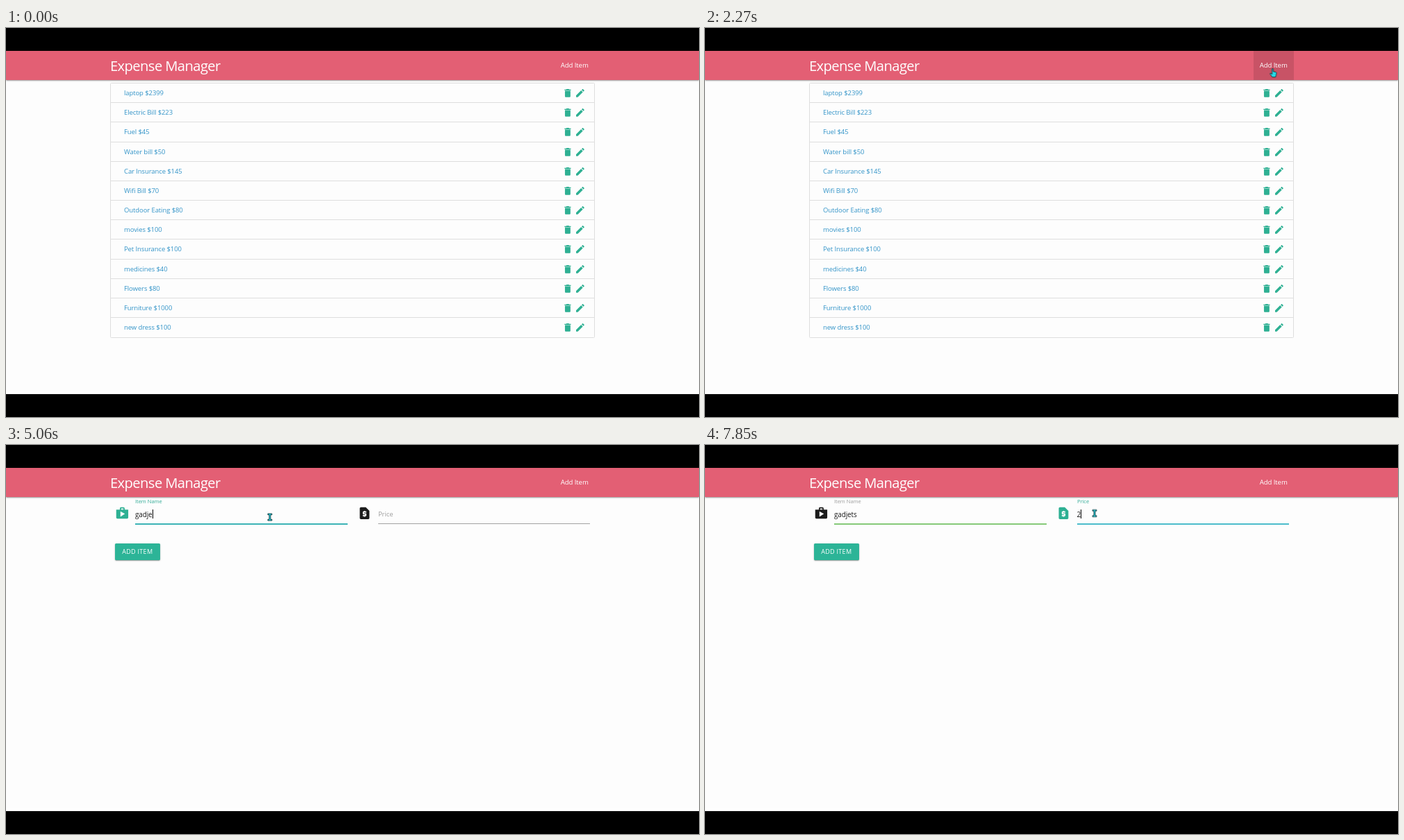
These frames come from a looping animation (998x561 px, 8 s). An HTML page:

```html
<!DOCTYPE html>
<html lang="en">
<head>
<meta charset="utf-8">
<title>Expense Manager</title>
<style>
* { box-sizing: border-box; }
html, body { margin: 0; width: 100%; height: 100%; overflow: hidden; background: #000; }
#stage {
  position: relative; width: 998px; height: 561px; overflow: hidden; background: #000;
  font: 9.5px/14px "Open Sans", "Noto Sans", sans-serif; letter-spacing: -.01em; white-space: pre;
}
#stage * { animation-duration: 8s; animation-iteration-count: infinite; animation-timing-function: linear; }
.abs, #stage > *, .field > * { position: absolute; }

#page { left: 0; top: 33px; width: 998px; height: 495px; background: #fdfdfd; border-bottom: 4px solid #fff; }
nav {
  left: 0; top: 33px; width: 998px; height: 42px; color: #fff; background: #e35f74;
  box-shadow: 0 1px 1.5px rgba(0,0,0,.16), 0 2px 1px -1px rgba(0,0,0,.12), 0 .5px 3px rgba(0,0,0,.2);
}
nav b { left: 150px; top: 0; font-size: 20.2px; font-weight: 400; line-height: 43.5px; letter-spacing: -.03em; }
nav a { left: 789.5px; top: 0; width: 58.5px; height: 42px; line-height: 41.5px; font-size: 9.6px; text-align: center; }
nav i { left: 789.5px; top: 0; width: 58.5px; height: 42px; background: rgba(0,0,0,.12); animation-name: hover; }

#list {
  left: 150px; top: 79px; width: 698px; margin: 0; padding: 0; list-style: none;
  border: 1px solid #dedede; border-radius: 1.5px; color: #3394c8; animation-name: list;
}
#list li { position: relative; height: 28.18px; padding-left: 19px; line-height: 27.4px; border-bottom: 1px solid #dedede; }
#list li:last-child { border-bottom: 0; }
#list svg { position: absolute; top: 6px; left: 649.7px; width: 15.8px; height: 15.8px; fill: #2eb093; }
#list svg + svg { left: 667.9px; }

#form { left: 0; top: 0; width: 998px; height: 561px; animation-name: form; }
#stage #list, #stage #form { animation-timing-function: step-end; }
.field { top: 0; }
.field svg { left: -29.5px; top: 88px; width: 20.8px; height: 20.8px; fill: #1c1c1c; }
.field label { left: 0; top: 92.5px; color: #9e9e9e; transform-origin: 0 50%; }
.field hr { left: 0; top: 113px; width: 305.5px; height: 1px; margin: 0; border: 0; background: #a2a2a2; }
.field span { left: 0; top: 92.5px; font-size: 9.9px; color: #1a1a1a; }
.field span.wrong { text-decoration: underline 1px #d8323c; text-underline-offset: 1px; text-decoration-skip-ink: none; }
.field i { top: 92.5px; width: 1px; height: 13px; background: #000; }
#item { left: 186px; }
#item svg { animation-name: itemIcon; }
#item label { animation-name: itemLabel; }
#item hr { animation-name: itemLine; }
#price { left: 535.5px; }
#price svg { animation-name: priceIcon; }
#price label { animation-name: priceLabel; }
#price hr { animation-name: priceLine; }
button {
  left: 157px; top: 142px; width: 64.5px; height: 23.5px; padding: 0; border: 0; border-radius: 1.5px;
  font: 9px/23.5px "Open Sans", "Noto Sans", sans-serif; letter-spacing: .3px; color: #fff; background: #2cb497;
  box-shadow: 0 1px 1.5px rgba(0,0,0,.2), 0 2px 1px -1px rgba(0,0,0,.14), 0 .5px 3px rgba(0,0,0,.16);
}

#cursor { left: 0; top: 0; width: 1px; height: 1px; animation-name: move; }
#cursor svg { position: absolute; left: 0; top: 0; overflow: visible; opacity: 0; fill: #23dbe8; stroke: #16363c; stroke-width: .9; stroke-linejoin: round; }
#stage #cursor svg { animation-timing-function: step-end; }
#arrow { animation-name: arrow; }
#hand { animation-name: hand; }
#beam { animation-name: beam; }

@keyframes list { 0% { visibility: visible } 28.75%, 100% { visibility: hidden } }
@keyframes form { 0% { visibility: hidden } 28.75%, 100% { visibility: visible } }
@keyframes hover { 0%, 9.9% { opacity: 0 } 13.65%, 31.9% { opacity: 1 } 35.65%, 100% { opacity: 0 } }

@keyframes move {
  0%, .375% { transform: translate(996px, 330px); animation-timing-function: ease-out }
  10.6% { transform: translate(827px, 61px) }
  11.6% { transform: translate(826px, 59.5px) }
  20% { transform: translate(822px, 60.5px) }
  27%, 31% { transform: translate(817.5px, 58px); animation-timing-function: ease-in-out }
  40.6%, 77% { transform: translate(380px, 104px); animation-timing-function: ease-in-out }
  83.5% { transform: translate(559.5px, 98.5px) }
  85%, 100% { transform: translate(561px, 98.5px) }
}
@keyframes arrow { 0% { opacity: 0 } .375% { opacity: 1 } 9.9% { opacity: 0 } 31.9% { opacity: 1 } 36.6%, 100% { opacity: 0 } }
@keyframes hand { 0% { opacity: 0 } 9.9% { opacity: 1 } 31.9%, 100% { opacity: 0 } }
@keyframes beam { 0% { opacity: 0 } 36.6%, 100% { opacity: 1 } }

@keyframes itemIcon { 0%, 45.875% { fill: #1c1c1c } 49.625%, 87.875% { fill: #2eb093 } 91.625%, 100% { fill: #1c1c1c } }
@keyframes itemLabel {
  0%, 45.875% { transform: none; color: #9e9e9e; animation-timing-function: ease-out }
  48.375%, 87.875% { transform: translateY(-18.5px) scale(.8); color: #35ac98 }
  91.625%, 100% { transform: translateY(-18.5px) scale(.8); color: #9e9e9e }
}
@keyframes itemLine {
  0%, 45.875% { height: 1px; background: #a2a2a2 }
  49.625%, 87.875% { height: 1.9px; background: #3cb3b6 }
  91.625%, 100% { height: 1.9px; background: #86c978 }
}
@keyframes priceIcon { 0%, 87.875% { fill: #1c1c1c } 91.625%, 100% { fill: #2eb093 } }
@keyframes priceLabel {
  0%, 87.875% { transform: none; color: #9e9e9e; animation-timing-function: ease-out }
  90.375%, 100% { transform: translateY(-18.5px) scale(.8); color: #35ac98 }
}
@keyframes priceLine { 0%, 87.875% { height: 1px; background: #a2a2a2 } 91.625%, 100% { height: 1.9px; background: #4bbccb } }
</style>
</head>
<body>
<svg width="0" height="0" style="position:absolute">
  <symbol id="bin" viewBox="0 0 24 24"><path d="M6 19c0 1.1.9 2 2 2h8c1.1 0 2-.9 2-2V7H6v12zM19 4h-3.5l-1-1h-5l-1 1H5v2h14V4z"/></symbol>
  <symbol id="pen" viewBox="0 0 24 24"><path d="M3 17.25V21h3.75L17.81 9.94l-3.75-3.75L3 17.25zM20.71 7.04c.39-.39.39-1.02 0-1.41l-2.34-2.34c-.39-.39-1.02-.39-1.41 0l-1.83 1.83 3.75 3.75 1.83-1.83z"/></symbol>
</svg>
<div id="stage">
  <div id="page"></div>
  <nav><i class="abs"></i><b class="abs">Expense Manager</b><a class="abs">Add Item</a></nav>
  <ul id="list"></ul>
  <div id="form">
    <div class="abs field" id="item">
      <svg viewBox="0 0 24 24"><path d="M16 6V4c0-1.11-.89-2-2-2h-4c-1.11 0-2 .89-2 2v2H2v13c0 1.11.89 2 2 2h16c1.11 0 2-.89 2-2V6h-6zm-6-2h4v2h-4V4zM9 18V9l7.5 4L9 18z"/></svg>
      <label>Item Name</label><hr><span></span><i></i>
    </div>
    <div class="abs field" id="price">
      <svg viewBox="0 0 24 24"><path d="M14 2H6c-1.1 0-2 .9-2 2v16c0 1.1.9 2 2 2h12c1.1 0 2-.9 2-2V8l-6-6zm1 9h-4v1h3c.55 0 1 .45 1 1v3c0 .55-.45 1-1 1h-1v1h-2v-1H9v-2h4v-1h-3c-.55 0-1-.45-1-1v-3c0-.55.45-1 1-1h1V8h2v1h2v2z"/></svg>
      <label>Price</label><hr><span></span><i></i>
    </div>
    <button class="abs" tabindex="-1">ADD ITEM</button>
  </div>
  <div id="cursor">
    <svg id="arrow" width="10" height="14"><path d="M0 0V11.2L2.6 8.8 4.3 12.6 6 11.8 4.4 8.2H8z"/></svg>
    <svg id="hand" width="10" height="14"><path d="M-.9 .9Q0-.5 .9 .9V4.8L4.6 5.6Q5.6 5.9 5.5 7L5 10.2 4.2 12.8H-.6L-3.6 8.6Q-4.2 7.2-3 7.1L-.9 8.6z"/></svg>
    <svg id="beam" width="10" height="14"><path d="M-3-5H3V-3.3H1V3.3H3V5H-3V3.3H-1V-3.3H-3z"/></svg>
  </div>
</div>
<script>
const LOOP = 8000, BLINK = 530;
const expenses = ["laptop $2399", "Electric Bill $223", "Fuel $45", "Water bill $50", "Car Insurance $145",
  "Wifi Bill $70", "Outdoor Eating $80", "movies $100", "Pet Insurance $100", "medicines $40",
  "Flowers $80", "Furniture $1000", "new dress $100"];
const icon = name => `<svg><use href="#${name}"/></svg>`;
document.getElementById("list").innerHTML =
  expenses.map(e => `<li>${e}${icon("bin")}${icon("pen")}</li>`).join("");

// Each field has focus and blur times, and one time per typed character.
const fields = [
  { id: "item", text: "gadjets", focus: 3670, blur: 7030, keys: [4320, 4490, 4660, 4910, 5060, 5160, 5630], wrongFrom: 6160 },
  { id: "price", text: "2", focus: 7030, blur: LOOP, keys: [7800], wrongFrom: LOOP }
].map(f => ({
  ...f,
  span: document.querySelector(`#${f.id} span`),
  caret: document.querySelector(`#${f.id} i`)
}));

function drawField(f, t) {
  const typed = f.keys.filter(k => k <= t).length;
  const last = typed ? f.keys[typed - 1] : f.focus;
  const focused = t >= f.focus && t < f.blur;
  const lit = Math.floor((t - last) / BLINK) % 2 === 0;
  f.span.textContent = f.text.slice(0, typed);
  f.span.classList.toggle("wrong", focused && t >= f.wrongFrom);
  f.caret.style.left = f.span.getBoundingClientRect().width + "px";
  f.caret.style.opacity = focused && lit ? 1 : 0;
}

let start;
function tick(now) {
  start ??= now;
  const t = (now - start) % LOOP;
  fields.forEach(f => drawField(f, t));
  requestAnimationFrame(tick);
}
requestAnimationFrame(tick);
</script>
</body>
</html>
```
